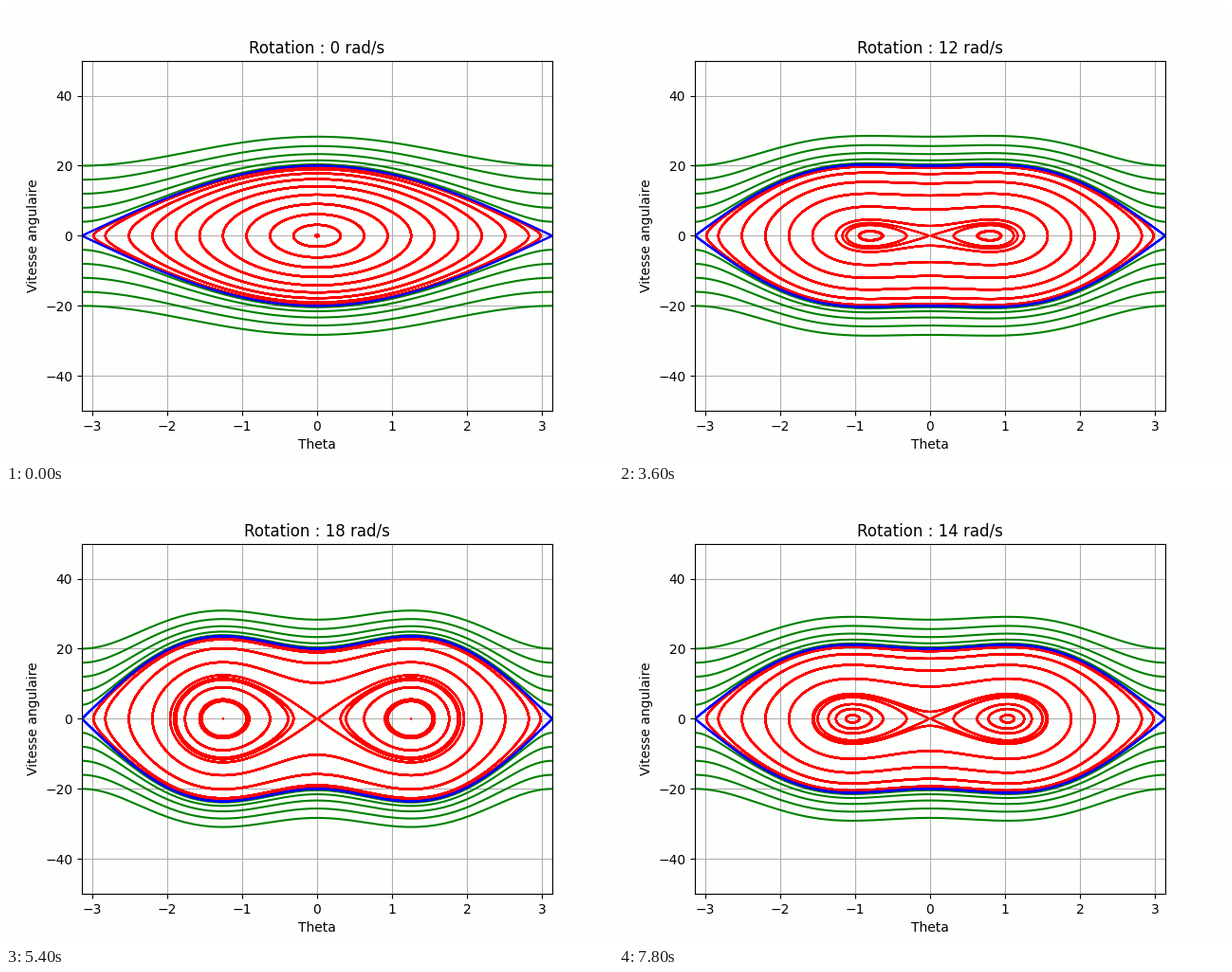
Recreate the animation shown at these times as a matplotlib script. Size 640 by 480 pixels, loop 8 s.

```python
import numpy as np
import matplotlib.pyplot as plt
from matplotlib.animation import FuncAnimation

W0 = 10.0            # natural pulsation, rad/s
MAX_SPIN = 20
DT, STEPS = 0.004, 1000
PAPER = "#fdfffd"


def both_signs(values):
    return [sign * v for v in values for sign in (1, -1)]


def trajectories(starts, spins):
    """RK4 for every spin and start at once: (step, theta/omega, spin, start)."""
    spin2 = spins[:, None] ** 2

    def slope(s):
        theta, omega = s
        return np.array([omega, np.sin(theta) * (spin2 * np.cos(theta) - W0**2)])

    state = np.repeat(np.array(starts).T[:, None, :], len(spins), axis=1)
    path = [state]
    for _ in range(STEPS):
        k1 = slope(state)
        k2 = slope(state + DT / 2 * k1)
        k3 = slope(state + DT / 2 * k2)
        k4 = slope(state + DT * k3)
        state = state + DT / 6 * (k1 + 2 * k2 + 2 * k3 + k4)
        path.append(state)
    return np.array(path)


turning = [(-np.copysign(np.pi, w), w) for w in both_signs(range(4, 21, 4))]
amplitudes = [0.02] + [k * np.pi / 10 for k in range(1, 10)] + [0.95 * np.pi]
swinging = [(a, 0.0) for a in both_signs(amplitudes)]
separatrix = [(a, 0.0) for a in both_signs([0.9999 * np.pi])]

starts = turning + swinging + separatrix
colors = (["green"] * len(turning) + ["red"] * len(swinging)
          + ["blue"] * len(separatrix))
paths = trajectories(starts, np.arange(MAX_SPIN + 1.0))

fig, ax = plt.subplots(figsize=(6.4, 4.8), dpi=100, facecolor=PAPER)
ax.set_facecolor(PAPER)
ax.set_xlim(-np.pi, np.pi)
ax.set_ylim(-50, 50)
ax.set_xlabel("Theta")
ax.set_ylabel("Vitesse angulaire")
ax.grid(True)
title = ax.set_title("")
lines = [ax.plot([], [], color=c, lw=1.5)[0] for c in colors]


def update(i):
    step = i // 3    # one rad/s every 300 ms, up then down
    spin = MAX_SPIN - abs(MAX_SPIN - step)
    title.set_text(f"Rotation : {spin} rad/s")
    for n, line in enumerate(lines):
        line.set_data(paths[:, 0, spin, n], paths[:, 1, spin, n])
    return [title, *lines]


anim = FuncAnimation(fig, update, frames=80, interval=100,
                     repeat=True, repeat_delay=0, blit=False)
plt.show()
```
